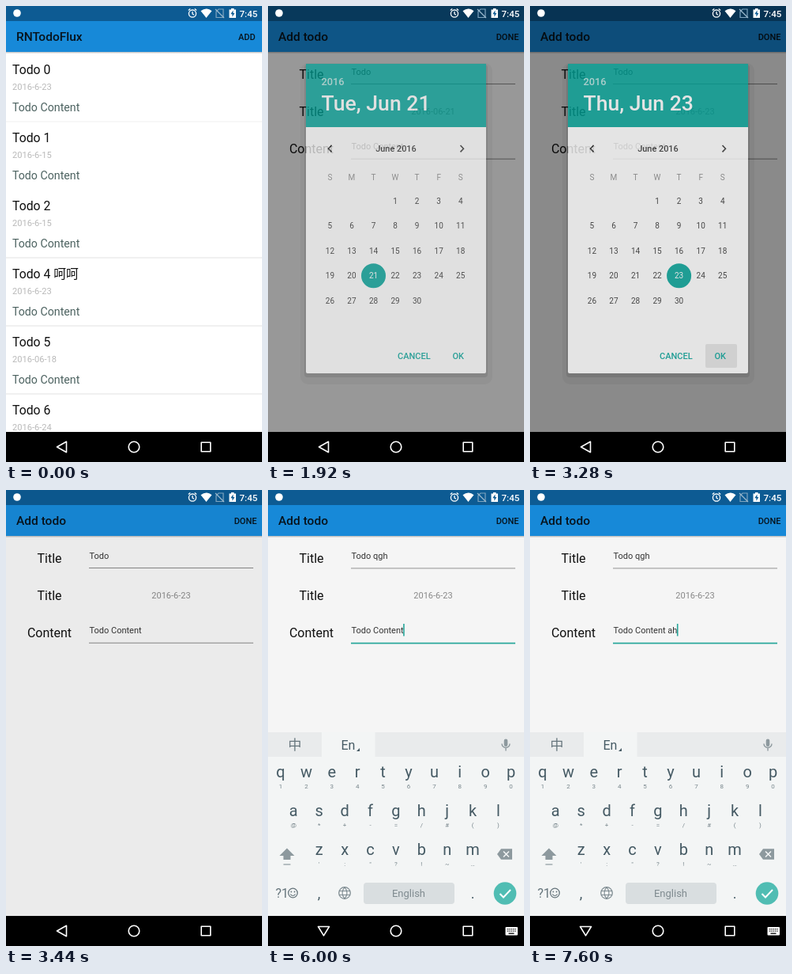
An HTML page for the animation above (8000 ms loop, 324 by 576 pixels).

```html
<!DOCTYPE html>
<html lang="en">
<head>
<meta charset="utf-8">
<style>
  html, body { margin: 0; height: 100%; overflow: hidden; background: #000; }
  svg { display: block; width: 100vw; height: 100vh; }
  text { font-family: Roboto, "Noto Sans CJK SC", "Noto Sans CJK", sans-serif; white-space: pre; }
</style>
</head>
<body>
<svg id="stage" viewBox="0 0 324 576"></svg>
<script>
const LOOP = 8000;
const TEAL = '#00a398', INK = '#455a64', KEY_SUB = '#78868c';
const stage = document.getElementById('stage');

// ---- markup helpers ----
const attrs = o => Object.entries(o).map(([k, v]) => `${k}="${v}"`).join(' ');
const rect = (x, y, width, height, fill, more = {}) =>
  `<rect ${attrs({ x, y, width, height, fill, ...more })}/>`;
const circle = (cx, cy, r, fill, more = {}) => `<circle ${attrs({ cx, cy, r, fill, ...more })}/>`;
const text = (x, y, size, fill, str, more = {}) =>
  `<text ${attrs({ x, y, 'font-size': size, fill, ...more })}>${str}</text>`;
const path = (d, more) => `<path ${attrs({ d, fill: 'none', ...more })}/>`;
const group = (id, body, more = {}) => `<g ${attrs({ id, ...more })}>${body}</g>`;
const MID = { 'text-anchor': 'middle' };
const MEDIUM = { 'font-weight': 500 };

// ---- screens ----
const toolbar = (title, action, x) =>
  rect(0, 58, 324, 2.5, 'url(#shade)') + rect(0, 19, 324, 39, '#1789d8') +
  text(13, 43.5, 15.5, '#07131c', title, MEDIUM) +
  text(x, 42.5, 11, '#07131c', action, MEDIUM);

function listScreen() {
  const rows = [
    ['0', '2016-6-23'], ['1', '2016-6-15'], ['2', '2016-6-15'],
    ['4 呵呵', '2016-6-23'], ['5', '2016-06-18'], ['6', '2016-6-24']
  ];
  return rect(0, 19, 324, 519, '#fff') + rows.map(([name, date], i) => {
    const y = 86 * i;
    return text(8, y + 86, 15.8, '#111', 'Todo ' + name) +
      text(8, y + 106, 11.1, '#b9b9b9', date) +
      text(8, y + 132.5, 14.2, '#4c6260', 'Todo Content') +
      (i === 1 ? '' : rect(0, y + 145.5, 324, 1, i ? '#e2e2e2' : '#f0f0f0'));
  }).join('') + toolbar('RNTodoFlux', 'ADD', 294) +
    circle(305, 38, 0, '#000', { id: 'addRipple' });
}

function formScreen() {
  const label = (y, s) => text(55, y, 16, '#111', s, MID);
  return rect(0, 19, 324, 519, '#f5f5f5') +
    label(92, 'Title') + label(139, 'Title') + label(186, 'Content') +
    text(105.5, 86.5, 11, '#333', '', { id: 'titleText' }) +
    text(105.5, 181, 11, '#333', '', { id: 'contentText' }) +
    text(209, 137.2, 11, '#888', '', { id: 'dateText', ...MID }) +
    rect(105, 98, 208, 1, '#888', { id: 'titleLine' }) +
    rect(105, 192.7, 208, 1, '#888', { id: 'contentLine' }) +
    rect(0, 0, 1.6, 15.5, '#26a69a', { id: 'cursor' }) +
    toolbar('Add todo', 'DONE', 288.7);
}

const dayPos = day => {
  const cell = day + 2;
  return [78.4 + 27.55 * (cell % 7), 246.3 + 31.5 * Math.floor(cell / 7)];
};

function dialog() {
  let days = '';
  for (let d = 1; d <= 30; d++) {
    const [x, y] = dayPos(d);
    days += text(x, y + 3.6, 10, '#333', d, { id: 'day' + d, ...MID });
  }
  const week = [...'SMTWTFS'].map((c, i) =>
    text(78.4 + 27.55 * i, 219.7, 10, '#8a8a8a', c, MID)).join('');
  const chevron = d => path(d, { stroke: '#333', 'stroke-width': 1.6 });
  return rect(41, 72, 243, 406, '#000', { rx: 10, opacity: .06 }) +
    rect(46, 74, 232, 395, '#000', { rx: 4, opacity: .12 }) +
    rect(48, 73, 228, 391, '#fff', { rx: 2 }) + rect(48, 73, 228, 80, TEAL) +
    text(67.5, 100, 12.8, '#b6e3df', '2016', MEDIUM) +
    text(67.5, 132, 26.6, '#fff', '', { id: 'dialogDate', ...MEDIUM }) +
    chevron('M80.5 176 L76.5 180.2 L80.5 184.4') + chevron('M243.5 176 L247.5 180.2 L243.5 184.4') +
    text(162, 184, 10.9, '#333', 'June 2016', { ...MID, ...MEDIUM }) + week +
    circle(...dayPos(23), 15.5, '#e4e5e6', { id: 'dayPress' }) +
    circle(0, 0, 15.5, TEAL, { id: 'dayMark' }) + days +
    rect(222, 427, 40, 30, '#000', { id: 'okPress', rx: 2 }) +
    text(164, 446, 11, TEAL, 'CANCEL', MEDIUM) + text(233.5, 446, 11, TEAL, 'OK', MEDIUM);
}

// ---- keyboard ----
const keyRows = [
  { keys: 'qwertyuiop', subs: '1234567890', x: 16, y: 363 },
  { keys: 'asdfghjkl', subs: '@*+-=/#()', x: 32.3, y: 412 },
  { keys: 'zxcvbnm', subs: '\':"?!~…', x: 64.7, y: 461 }
];
const keyBox = { ' ': [121, 496, 115, 27] };
for (const { keys, x, y } of keyRows)
  [...keys].forEach((k, i) => keyBox[k] = [x + 32.4 * i - 16, y - 27, 32, 46]);

function keyboard() {
  const letters = keyRows.map(({ keys, subs, x, y }) => [...keys].map((k, i) =>
    text(x + 32.4 * i, y, 20, INK, k, MID) +
    text(x + 32.4 * i, y + 14, 8, KEY_SUB, subs[i], MID)).join('')).join('');
  const line = (d, stroke, w) => path(d, { stroke, 'stroke-width': w });
  const tabs = rect(68, 306, 67.5, 31, '#f3f5f5') +
    text(34, 328, 17, '#66757c', '中', MID) + text(92.5, 327.5, 16, INK, 'En') +
    path('M116 326 V330 H112 Z', { style: 'fill:' + INK }) +
    rect(298.7, 314.5, 4.6, 9.5, '#8d999e', { rx: 2.3 }) +
    line('M296 320.5 A5 5 0 0 0 306 320.5 M301 325.5 V329.5', '#8d999e', 1.4);
  return rect(0, 306, 324, 232, '#f3f5f5') + rect(0, 306, 324, 31, '#e9ebec') +
    group('tabs', tabs) + text(14, 327, 15, INK, '', { id: 'candidate' }) +
    rect(121, 496, 115, 27, '#d9dee0', { rx: 4 }) +
    rect(0, 0, 0, 0, '#bcc6ca', { id: 'keyPress', rx: 3, opacity: .7 }) + letters +
    path('M24 452.5 L33.5 462 H28.5 V467 H19.5 V462 H14.5 Z', { style: 'fill:#8d999e' }) +
    line('M19.5 473 H28.5', '#8d999e', 1.2) +
    path('M290 460 L295 453.2 H309 V466.8 H295 Z', { style: 'fill:#8d999e' }) +
    line('M298 456.5 L305 463.5 M305 456.5 L298 463.5', '#f3f5f5', 1.5) +
    text(9.5, 515, 16, '#66757c', '?1') +
    circle(31.5, 509, 5.8, 'none', { stroke: '#66757c', 'stroke-width': 1.3 }) +
    circle(29.4, 507.5, .9, '#66757c') + circle(33.6, 507.5, .9, '#66757c') +
    line('M28.3 510.5 Q31.5 514.5 34.7 510.5', '#66757c', 1.2) +
    text(64.5, 516, 18, INK, ',', MID) + text(259, 516, 18, INK, '.', MID) +
    circle(97, 509, 7.3, 'none', { stroke: '#7f8c92', 'stroke-width': 1.3 }) +
    line('M90 506.5 H104 M90 511.5 H104 M97 501.7 Q91 509 97 516.3 Q103 509 97 501.7', '#7f8c92', 1.1) +
    text(178, 514, 13, '#7f8a8f', 'English', MID) +
    circle(300, 509.5, 14.3, '#50bdb3') + line('M293.5 510 L298 514.5 L307 505', '#fff', 2);
}

// ---- system bars ----
function statusIcons() {
  const white = { stroke: '#fff', 'stroke-width': 1.3 };
  const fill = c => ({ style: 'fill:' + c });
  return circle(14, 9, 4.8, '#fff') +
    circle(236, 9.6, 4.6, 'none', white) +
    path('M236 7 V10 L238 11.2 M230.8 5.6 L233.3 3.6 M241.2 5.6 L238.7 3.6', white) +
    path('M246.5 6.2 Q253.5 .8 260.5 6.2 L253.5 15 Z', fill('#fff')) +
    path('M269 4 H275 V14.5 H266 V7 Z', { stroke: '#7fa5c0', 'stroke-width': 1.2 }) +
    path('M265 4 L276 15', { stroke: '#9bb9cd', 'stroke-width': 1.2 }) +
    path('M282.5 4.5 H285 V3 H288.5 V4.5 H291 V15 H282.5 Z', fill('#fff')) +
    path('M287.5 5.5 L284.3 10.3 H286.4 V13.8 L289.4 9 H287.5 Z', fill('#0d5b93')) +
    text(295.5, 13.6, 11.6, '#fff', '7:45', MEDIUM);
}

function navBar() {
  const outline = { stroke: '#fff', 'stroke-width': 1.6, 'stroke-linejoin': 'round' };
  let dots = '';
  for (let i = 0; i < 10; i++)
    dots += rect(303 + 2.3 * (i % 5), 554 + 2.5 * Math.floor(i / 5), 1.2, 1.3, '#000');
  return rect(0, 538, 324, 38, '#000') +
    path('', { id: 'back', ...outline }) +
    circle(162, 557, 6.8, 'none', outline) +
    rect(247.2, 551.2, 11.6, 11.6, 'none', outline) +
    group('imeIcon', rect(300.5, 552, 15.5, 10.5, '#fff', { rx: 1 }) + dots + rect(304.5, 559.5, 7, 1.3, '#000'));
}

stage.innerHTML =
  `<defs><linearGradient id="shade" x2="0" y2="1"><stop stop-opacity=".25"/>
   <stop offset="1" stop-opacity="0"/></linearGradient></defs>` +
  group('list', listScreen()) + group('form', formScreen()) +
  rect(0, 0, 324, 19, '#0d5b93') +
  rect(0, 0, 324, 538, '#000', { id: 'scrim' }) +
  group('dialog', dialog()) + statusIcons() +
  group('keyboard', keyboard()) + navBar();

// ---- motion ----
const el = {};
stage.querySelectorAll('[id]').forEach(n => el[n.id] = n);
const set = (id, o) => { for (const k in o) el[id].setAttribute(k, o[k]); };
const say = (id, s) => { if (el[id].textContent !== s) el[id].textContent = s; };
const show = (id, on) => set(id, { visibility: on ? 'visible' : 'hidden' });
const ramp = (t, a, b) => Math.min(1, Math.max(0, (t - a) / (b - a)));
const easeOut = p => 1 - (1 - p) ** 3;
const within = (t, a, b) => t >= a && t < b;

const presses = [[4880, 'q'], [5040, 'g'], [5200, 'h'], [6480, ' '], [6960, 'a'], [7200, 'h']];
const typed = (t, from, to) =>
  presses.filter(([at]) => at >= from && at < to && t >= at + 80).map(p => p[1]).join('');

function render(t) {
  // list to form
  const slide = easeOut(ramp(t, 700, 1200));
  set('list', { transform: `translate(${-100 * slide} 0)` });
  set('form', { transform: `translate(${324 * (1 - slide)} 0)` });
  show('form', slide > 0);
  set('addRipple', { r: 24 * easeOut(ramp(t, 550, 760)), opacity: .14 * (1 - ramp(t, 760, 960)) });

  // date picker
  const fade = easeOut(ramp(t, 1800, 2160));
  set('scrim', { opacity: .54 * fade * (1 - ramp(t, 3240, 3456)) });
  set('dialog', { opacity: fade * (1 - ramp(t, 3240, 3420)) });
  const picked = t >= 2800 ? 23 : 21;
  const [cx, cy] = dayPos(picked);
  set('dayMark', { cx, cy });
  show('dayPress', within(t, 2640, 2800));
  for (const d of [21, 23]) set('day' + d, { fill: d === picked ? '#fff' : '#333' });
  say('dialogDate', picked === 23 ? 'Thu, Jun 23' : 'Tue, Jun 21');
  set('okPress', { opacity: .1 * ramp(t, 3100, 3200) });
  say('dateText', t >= 3240 ? '2016-6-23' : '2016-06-21');

  // text fields
  const focus = t < 3800 ? '' : t < 5440 ? 'title' : 'content';
  const title = 'Todo ' + typed(t, 4800, 5400);
  const tail = typed(t, 6400, 7600);
  say('titleText', title);
  say('contentText', 'Todo Content' + tail);
  for (const f of ['title', 'content']) {
    const blurred = f === 'title' && focus === 'content';
    set(f + 'Line', {
      fill: f === focus ? '#26a69a' : blurred ? '#bbb' : '#888',
      height: f === focus || blurred ? 1.7 : 1
    });
  }
  const blinkOff = within(t, 3900, 4400) || within(t, 5600, 6000);
  show('cursor', focus && !blinkOff);
  if (focus) set('cursor', {
    x: 105 + el[focus + 'Text'].getComputedTextLength(),
    y: focus === 'title' ? 74.5 : 169
  });

  // keyboard
  const rise = easeOut(ramp(t, 3880, 4240));
  set('keyboard', { transform: `translate(0 ${232 * (1 - rise)})` });
  show('keyboard', rise > 0);
  show('imeIcon', rise > 0);
  set('back', { d: rise > 0 ? 'M63.5 551.5 H77.5 L70.5 562.8 Z' : 'M64.5 557 L76.5 550.3 V563.7 Z' });
  const press = presses.find(([at]) => within(t, at, at + 130));
  show('keyPress', press && rise > 0);
  if (press) {
    const [x, y, width, height] = keyBox[press[1]];
    set('keyPress', { x, y, width, height });
  }
  const word = t < 6000 ? title.slice(5) : tail.trim();
  const suggest = Math.max(
    ramp(t, 4940, 5020) * (1 - ramp(t, 5440, 5600)),
    ramp(t, 7020, 7100) * (1 - ramp(t, 7500, 7600)));
  say('candidate', word);
  set('candidate', { opacity: suggest });
  set('tabs', { opacity: 1 - suggest });
}

const start = performance.now();
function tick() {
  render((performance.now() - start) % LOOP);
  requestAnimationFrame(tick);
}
tick();
</script>
</body>
</html>
```
